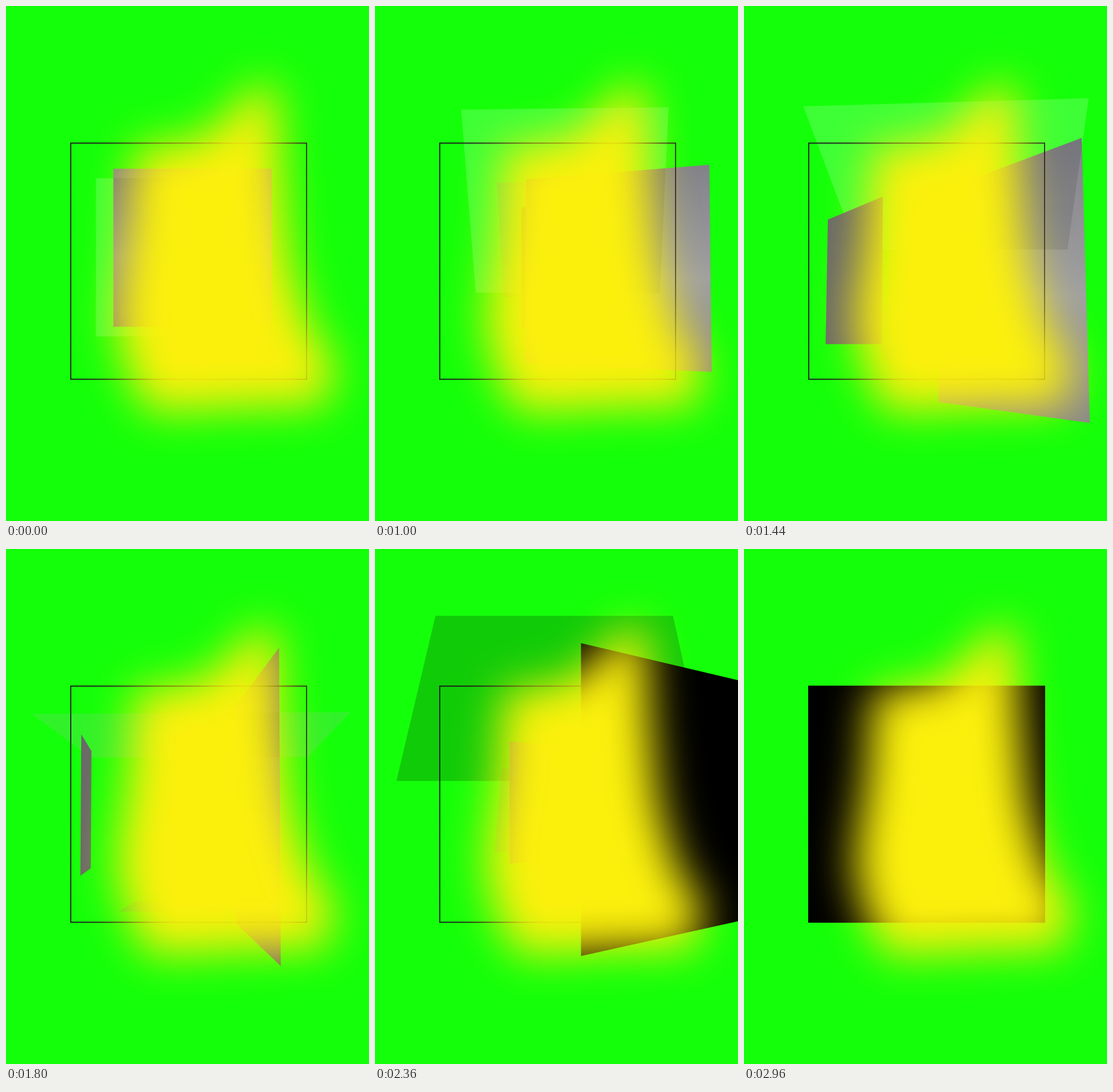
These frames come from a looping animation (628 by 892 pixels, 3000 ms). An HTML page with a canvas:

```html
<!DOCTYPE html>
<html lang="en">
<head>
<meta charset="utf-8">
<title>Turning panels</title>
<style>
html, body { margin: 0; width: 100%; height: 100%; overflow: hidden; background: #14ff0a; }
canvas { display: block; }
</style>
</head>
<body>
<canvas id="stage" width="628" height="892"></canvas>
<script>
const W = 628, H = 892, LOOP = 3000, STEP = 40;
const CX = 316, CY = 442, HALF = 205, DEPTH = 1180;
const ctx = document.getElementById('stage').getContext('2d');

// Flight of the panel: time, x, y, z from the centre, turn in degrees.
const flight = [
  [0, 10, -35, -586, 0],
  [720, 75, -11, -480, 7],
  [1240, 145, 42, -32, 44],
  [1440, 125, 44, 28, 60],
  [1800, 103, 10, 99, 86],
  [2360, 178, -6, 145, 136],
  [2960, 0, 0, 0, 180]
];

const blob = [[222, 245], [330, 232], [395, 180], [425, 138], [468, 138],
  [477, 300], [490, 440], [525, 560], [566, 610], [556, 692],
  [420, 696], [245, 704], [205, 620], [190, 540], [212, 400]];

function fill(c, points, style) {
  c.beginPath();
  points.forEach(([x, y]) => c.lineTo(x, y));
  c.closePath();
  c.fillStyle = style;
  c.fill();
}

function makeGlow() {
  const layer = document.createElement('canvas');
  layer.width = W;
  layer.height = H;
  const c = layer.getContext('2d');
  c.filter = 'blur(38px)';
  fill(c, blob, 'rgb(251,240,12)');
  return layer;
}
const glow = makeGlow();

// Smooth curve through unevenly spaced keys.
function follow(keys, t) {
  const last = keys.length - 1;
  t = Math.min(t, keys[last][0]);
  let i = 0;
  while (i < last - 1 && t >= keys[i + 1][0]) i++;
  const a = keys[i], b = keys[i + 1];
  const before = keys[Math.max(i - 1, 0)], after = keys[Math.min(i + 2, last)];
  const span = b[0] - a[0], u = (t - a[0]) / span;
  return a.map((start, k) => {
    const m0 = (b[k] - before[k]) / (b[0] - before[0]) * span;
    const m1 = (after[k] - a[k]) / (after[0] - a[0]) * span;
    const d = b[k] - start;
    return start + u * (m0 + u * (3 * d - 2 * m0 - m1 + u * (m0 + m1 - 2 * d)));
  }).slice(1);
}

// Corners of a square panel turned about y, tilted about x, in perspective.
function project(x, y, z, turn, tilt) {
  return [[-1, -1], [1, -1], [1, 1], [-1, 1]].map(([i, j]) => {
    const u = i * HALF * Math.cos(turn), v = j * HALF, w = i * HALF * Math.sin(turn);
    const py = y + v * Math.cos(tilt) - w * Math.sin(tilt);
    const pz = z + v * Math.sin(tilt) + w * Math.cos(tilt);
    const scale = DEPTH / (DEPTH - pz);
    return [CX + (x + u) * scale, CY + py * scale];
  });
}

const quarterTurn = points => points.map(([x, y]) => [CX + y - CY, CY + CX - x]);
const isFlipped = ([p, q, , s]) =>
  (q[0] - p[0]) * (s[1] - p[1]) < (q[1] - p[1]) * (s[0] - p[0]);
const grey = (v, blue = 0) => `rgb(${v},${v},${v + blue})`;

function greyPaint(points, level) {
  const paint = ctx.createLinearGradient(0, points[1][1], 0, points[2][1]);
  paint.addColorStop(0, grey(level - 6, 8));
  paint.addColorStop(0.55, grey(level + 24, 2));
  paint.addColorStop(1, grey(level));
  return paint;
}

function drawFrame() {
  ctx.strokeStyle = '#1c0420';
  ctx.lineWidth = 1.7;
  ctx.strokeRect(112, 237.5, 408, 409);
}

function draw(t) {
  const [x, y, z, degrees] = follow(flight, t);
  const turn = degrees * Math.PI / 180;
  const tilt = 0.125 * Math.exp(-(((t - 1380) / 400) ** 2));
  const swing = 430 * Math.max(0, Math.sin(Math.PI * (t - 935) / 1670));
  const gap = 800 + 0.53 * Math.max(0, t - 1240);
  const front = project(x, y, z, turn, tilt);
  const back = project(x - swing, y, z - gap, turn, tilt);
  const veil = quarterTurn(front);
  const flipped = isFlipped(front);
  const facing = Math.min(1, 2 * Math.abs(Math.cos(turn)));
  const pale = 170 + 85 * facing;

  ctx.fillStyle = '#14ff0a';
  ctx.fillRect(0, 0, W, H);
  fill(ctx, quarterTurn(back), 'rgba(120,110,120,.25)');
  fill(ctx, veil, flipped ? 'rgba(0,0,0,.2)' : `rgba(${pale},${pale},${pale},.18)`);
  fill(ctx, back, grey(105));

  if (flipped) {
    drawFrame();
    fill(ctx, front, '#000');
  } else {
    fill(ctx, front, greyPaint(front, 100 + 36 * facing));
    ctx.save();
    ctx.clip();
    fill(ctx, veil, 'rgba(0,0,0,.1)');
    ctx.restore();
    drawFrame();
  }
  ctx.drawImage(glow, 0, 0);
}

const start = performance.now();
function tick() {
  const t = (performance.now() - start) % LOOP;
  draw(Math.floor(t / STEP) * STEP);
  requestAnimationFrame(tick);
}
tick();
</script>
</body>
</html>
```
